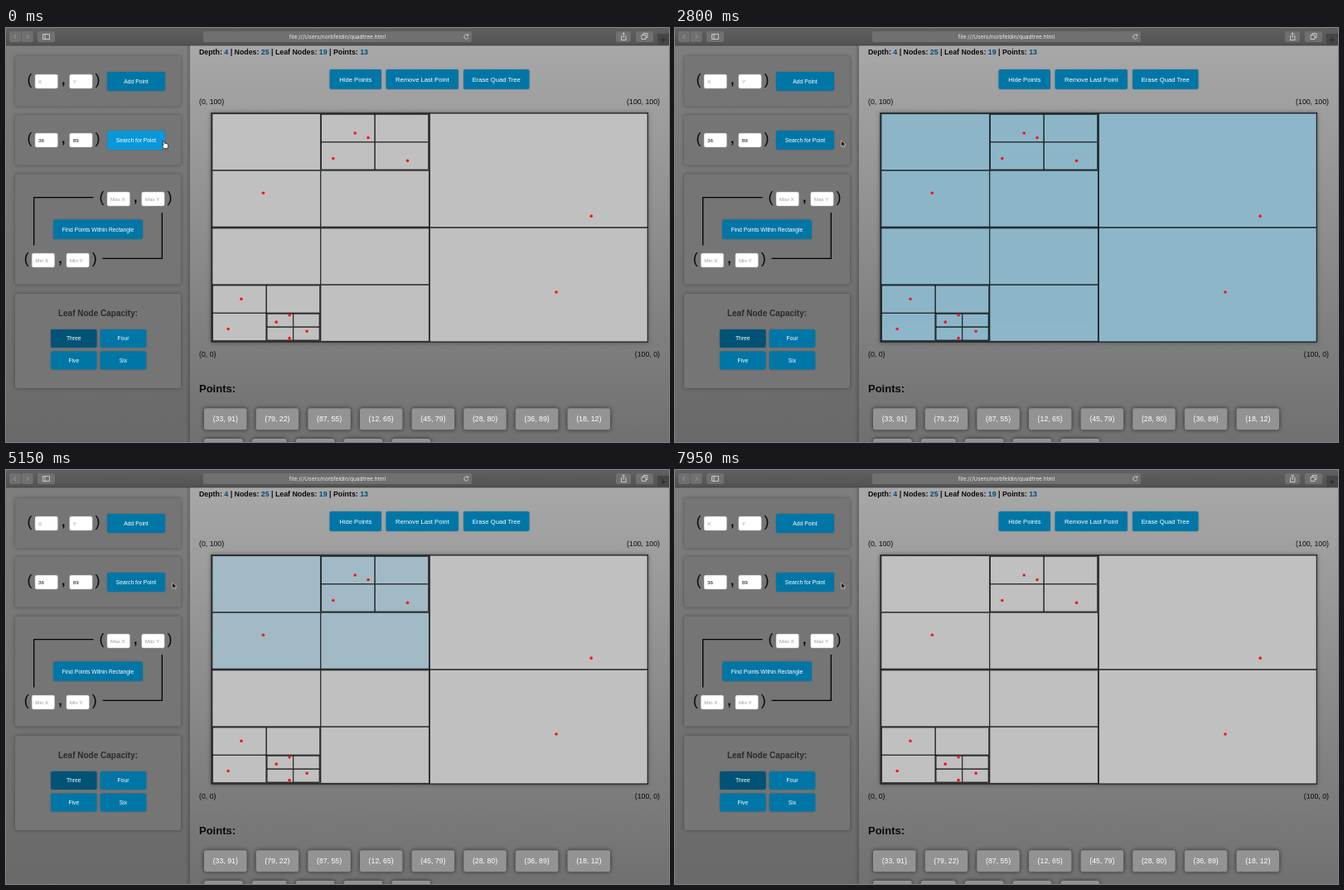
These frames come from a looping animation (800 by 500 pixels, 8 s). An HTML page:

```html
<!DOCTYPE html>
<html lang="en">
<head>
<meta charset="utf-8">
<title>Quadtree</title>
<style>
  html, body { margin: 0; width: 100%; height: 100%; overflow: hidden; background: #888; }
  svg { display: block; width: 800px; height: 500px; }
  text { font-family: "Liberation Sans", Arial, sans-serif; fill: #0a0a0a; white-space: pre; }
  .bold { font-weight: bold; }
  .mid { text-anchor: middle; }
  .end { text-anchor: end; }
  .light { fill: #fff; }
  .hint { fill: #999; }
  .count { fill: #004c75; }
  .url { font-family: Inter, sans-serif; fill: #eee; }
  .card { fill: #757575; filter: drop-shadow(0 0 2px rgba(0,0,0,.35)); }
  .button { fill: #0076a6; filter: drop-shadow(0 0 1px rgba(0,0,0,.2)); }
  .chosen { fill: #005376; }
  .chip { fill: #939393; filter: drop-shadow(0 0 2.5px rgba(0,0,0,.65)); }
  .input { fill: #fff; stroke: #aaa; stroke-width: .5; }
  .tool { fill: #707070; }
  .icon { fill: none; stroke: #ddd; stroke-width: .8; }
  .icon.dark { stroke: #222; }
  .line { fill: none; stroke: #000; }
  .flash { fill: #4babd4; opacity: 0; animation: flash 8s linear infinite; }
  .hover { animation: leave 8s linear infinite; }
  .cursor { animation: drift 8s linear infinite; }
  .hand { animation: hand 8s step-end infinite; }
  .arrow { animation: arrow 8s step-end infinite; }
  /* On at 1350 ms, off at 2460 ms, each an eased change of 1050 ms */
  @keyframes flash {
    0%, 16.9% { opacity: 0; animation-timing-function: ease; }
    30%, 30.75% { opacity: 1; animation-timing-function: ease; }
    43.9%, 100% { opacity: 0; }
  }
  @keyframes leave {
    0%, 20.6% { fill: #0898d8; }
    24%, 100% { fill: #0076a6; }
  }
  @keyframes drift {
    0%, 18.75% { transform: translate(189px, 136px); }
    25% { transform: translate(197px, 136px); }
    27.5%, 100% { transform: translate(201px, 136px); }
  }
  @keyframes hand { 0% { opacity: 1; } 20.6%, 100% { opacity: 0; } }
  @keyframes arrow { 0% { opacity: 0; } 20.6%, 100% { opacity: 1; } }
</style>
</head>
<body>
<svg id="stage" viewBox="0 0 800 500" xmlns="http://www.w3.org/2000/svg">
  <defs>
    <linearGradient id="page" x2="0" y2="1">
      <stop stop-color="#aaa"/><stop offset="1" stop-color="#707070"/>
    </linearGradient>
    <linearGradient id="side" x2="0" y2="1">
      <stop stop-color="#7e7e7e"/><stop offset="1" stop-color="#696969"/>
    </linearGradient>
    <linearGradient id="edge">
      <stop stop-color="#000" stop-opacity="0"/><stop offset="1" stop-color="#000" stop-opacity=".18"/>
    </linearGradient>
    <linearGradient id="bar" x2="0" y2="1">
      <stop stop-color="#606060"/><stop offset="1" stop-color="#525252"/>
    </linearGradient>
  </defs>
  <rect width="800" height="500" fill="url(#page)"/>
  <rect y="21" width="222" height="479" fill="url(#side)"/>
  <rect x="217" y="21" width="5" height="479" fill="url(#edge)"/>
</svg>
<script>
const stage = document.getElementById('stage');

function add(tag, attrs, parent = stage) {
  const node = document.createElementNS('http://www.w3.org/2000/svg', tag);
  for (const key in attrs) node.setAttribute(key, attrs[key]);
  return parent.appendChild(node);
}
const rect = (x, y, width, height, cls, rx = 0) =>
  add('rect', { x, y, width, height, rx, class: cls });
const path = (d, cls, width) =>
  add('path', { d, class: cls, ...(width && { 'stroke-width': width }) });
function text(str, x, y, size, cls = '') {
  const node = add('text', { x, y, 'font-size': size, class: cls });
  node.textContent = str;
  return node;
}
function button(label, x, y, w, h, size = 6.75, cls = '') {
  rect(x, y, w, h, 'button ' + cls, 2);
  text(label, x + w / 2, y + h / 2 + size * .35, size, 'mid light');
}
function input(value, x, y, cls) {
  rect(x, y, 27.5, 17, 'input', 2);
  text(value, x + 4, y + 11, 6.25, cls);
}
// Two inputs between large parentheses; y is the top of the inputs.
function pair(first, second, x, y, cls = 'hint') {
  text('(', x - 9.5, y + 12.2, 18);
  input(first, x, y, cls);
  text(',', x + 32, y + 12, 16, 'bold');
  input(second, x + 41.7, y, cls);
  text(')', x + 72.5, y + 12.2, 18);
}

// Browser bar
rect(0, 0, 800, 21, '').setAttribute('fill', 'url(#bar)');
rect(0, 20.5, 800, .8, '').setAttribute('fill', '#3c3c3c');
rect(786, 7, 14, 14, '').setAttribute('fill', '#464646');
for (const [x, w] of [[4, 14], [18.7, 14], [38, 21], [736, 18], [760, 21]]) rect(x, 4, w, 13, 'tool', 2);
rect(238, 4, 324, 13, 'tool', 2);
text('file:///Users/norbfeldin/quadtree.html', 400, 13.2, 6.6, 'mid url');
path('M12 8l-2.5 2.5 2.5 2.5M24.7 8l2.5 2.5-2.5 2.5', 'icon').setAttribute('opacity', .55);
path('M44.5 7.5h8v6h-8zM47 7.5v6', 'icon');
path('M557.5 9a2.6 2.6 0 1 0 .4 2.2M557.8 7.2v2h-2', 'icon');
path('M743.5 9.5h-1v5h5.5v-5h-1M745.2 12v-6M743.5 7.5l1.7-1.7 1.7 1.7', 'icon');
path('M767 8.5h5v5h-5zM769 8.5v-2h5v5h-2', 'icon');
path('M790 14.3h6M793 11.3v6', 'icon dark');

// Sidebar
for (const [y, h] of [[34, 60.5], [105, 60.5], [176.5, 133], [321, 114]]) rect(11, y, 200, h, 'card', 3);
pair('X', 'Y', 35, 56);
button('Add Point', 122, 53, 70, 23);
pair('36', '89', 35, 127, '');
button('Search for Point', 122, 124, 70, 23, 6.75, 'hover');
pair('Max X', 'Max Y', 122, 198);
pair('Min X', 'Min Y', 31.2, 272);
path('M33.7 262.5V204.7H105.5M188.3 223V278.4H116.5', 'line', 1.3);
button('Find Points Within Rectangle', 57, 231.5, 108, 23.5);
text('Leaf Node Capacity:', 111, 347.5, 10, 'bold mid').style.fill = '#2b2b2b';
['Three', 'Four', 'Five', 'Six'].forEach((label, i) =>
  button(label, 54 + i % 2 * 59.7, 364 + (i >> 1) * 26.5, 55.6, 22, 6.75, i ? '' : 'chosen'));

// Header
const stats = text('', 233, 31.7, 8.8, 'bold');
[['Depth: ', 4], [' | Nodes: ', 25], [' | Leaf Nodes: ', 19], [' | Points: ', 13]].forEach(([label, count]) => {
  add('tspan', {}, stats).textContent = label;
  add('tspan', { class: 'count' }, stats).textContent = count;
});
button('Hide Points', 390.5, 50, 62.5, 24, 7.65);
button('Remove Last Point', 458.5, 50, 87.5, 24, 7.65);
button('Erase Quad Tree', 552, 50, 79.5, 24, 7.65);
text('(0, 100)', 233, 91.7, 8.75);
text('(100, 100)', 789, 91.7, 8.75, 'end');
text('(0, 0)', 233, 397.3, 8.75);
text('(100, 0)', 789, 397.3, 8.75, 'end');

// Quadtree: nested boxes, each with its own thin border.
// A tree maps the split quadrants (0 NW, 1 NE, 2 SW, 3 SE) to their subtrees.
const border = .625;
const tree = { 0: { 1: {} }, 2: { 2: { 3: {} } } };
const outlines = [];
const flashes = [];
function grow(node, x, y, w, h, searched) {
  outlines.push([x + border / 2, y + border / 2, w - border, h - border]);
  if (!node) return;
  if (searched) flashes.push([x, y, w, h]);
  const halfW = w / 2 - border, halfH = h / 2 - border;
  for (let i = 0; i < 4; i++)
    grow(node[i], x + border + i % 2 * halfW, y + border + (i >> 1) * halfH, halfW, halfH, searched && i < 2);
}
const board = [247.4, 102.2, 527.6, 277.6];
grow(tree, ...board, true);
const base = rect(...board, '');
base.setAttribute('fill', '#c0c0c0');
base.style.filter = 'drop-shadow(0 0 2.5px rgba(0,0,0,.4))';
flashes.forEach((box, i) => rect(...box, 'flash').style.animationDelay = i * 2.22 + 's');
for (const box of outlines) rect(...box, 'line').setAttribute('stroke-width', border);

const points = [[33, 91], [79, 22], [87, 55], [12, 65], [45, 79], [28, 80], [36, 89], [18, 12],
  [7, 19], [4, 6], [15, 9], [22, 5], [18, 2]];
for (const [x, y] of points)
  add('circle', { cx: 247 + 5.278 * x, cy: 380.2 - 2.783 * y, r: 1.8, fill: '#f5141c' });

// Point chips
text('Points:', 233, 439.7, 13, 'bold');
let left = 239;
points.forEach(([x, y], i) => {
  if (i === 8) left = 239;
  const label = `(${x}, ${y})`;
  const width = 12.9 + label.length * 4.83;
  const top = i < 8 ? 459.3 : 496;
  rect(left, top, width, 26, 'chip', 3);
  text(label, left + width / 2, top + 16, 8.75, 'mid light');
  left += width + 11.1;
});

// Pointer
const cursor = add('g', { class: 'cursor' });
add('path', {
  class: 'hand', fill: '#fff', stroke: '#111', 'stroke-width': .8, 'stroke-linejoin': 'round',
  d: 'M0 .8q1-.9 1.7.3l.8 2.3q1.2-.6 1.5.3 1.1-.5 1.4.4 1.2-.2 1.2 1.2v2.2l-1 2.2h-3.8L-.9 6.3q-.3-1.2 1.7-.4z'
}, cursor);
add('path', {
  class: 'arrow', fill: '#000', stroke: '#eee', 'stroke-width': .6,
  d: 'M-.3 0v7.2l1.7-1.6 1.1 2.6 1.2-.5-1.1-2.5h2.4z'
}, cursor);
</script>
</body>
</html>
```
